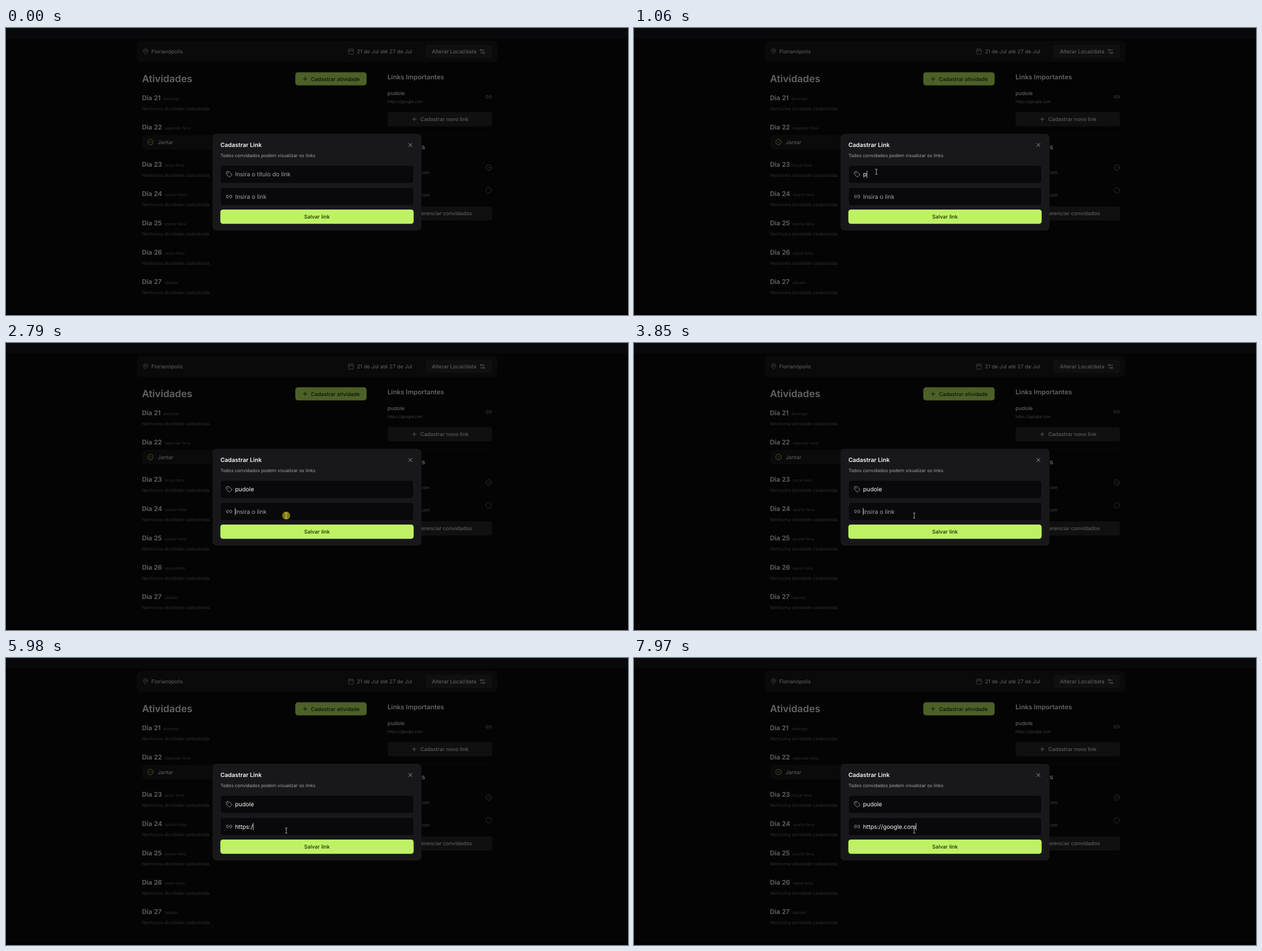
An HTML page that plays this animation: 1101x509 px, repeating every 8000 ms.

```html
<!DOCTYPE html>
<html lang="pt-BR">
<head>
<meta charset="utf-8">
<title>Cadastrar Link</title>
<style>
  html, body { margin: 0; width: 100%; height: 100%; overflow: hidden; background: #09090b; }
  svg { display: block; width: 1101px; height: 509px; }
  text { font-family: Inter, sans-serif; text-rendering: geometricPrecision; white-space: pre; }
  .icon { fill: none; stroke-width: 2; stroke-linecap: round; stroke-linejoin: round; }
</style>
</head>
<body>
<svg id="stage" viewBox="0 0 1905 880.7" preserveAspectRatio="none"></svg>
<script>
const stage = document.getElementById('stage');
const Z = { 50: '#fafafa', 100: '#f4f4f5', 200: '#e4e4e7', 400: '#a1a1aa', 500: '#71717a',
  800: '#27272a', 900: '#18181b', 950: '#09090b' };
const LIME = '#bef264', DARK_LIME = '#1a2e05';

const ICONS = {
  pin: '<path d="M20 10c0 6-8 12-8 12s-8-6-8-12a8 8 0 0 1 16 0Z"/><circle cx="12" cy="10" r="3"/>',
  calendar: '<path d="M8 2v4M16 2v4M3 10h18"/><rect x="3" y="4" width="18" height="18" rx="2"/>',
  settings: '<path d="M20 7h-9M14 17H5"/><circle cx="17" cy="17" r="3"/><circle cx="7" cy="7" r="3"/>',
  plus: '<path d="M5 12h14M12 5v14"/>',
  link: '<path d="M9 17H7A5 5 0 0 1 7 7h2M15 7h2a5 5 0 1 1 0 10h-2M8 12h8"/>',
  check: '<circle cx="12" cy="12" r="10"/><path d="m9 12 2 2 4-4"/>',
  dashed: '<circle cx="12" cy="12" r="10" stroke-dasharray="3.7 4.15"/>',
  close: '<path d="M18 6 6 18M6 6l12 12"/>',
  tag: '<path d="M12.6 2.6A2 2 0 0 0 11.2 2H4a2 2 0 0 0-2 2v7.2a2 2 0 0 0 .6 1.4l8.7 8.7a2.4 2.4 0 0 0 3.4 0l6.6-6.6a2.4 2.4 0 0 0 0-3.4z"/><circle cx="7.5" cy="7.5" r=".5"/>'
};

function add(tag, attrs, html = '', parent = stage) {
  const el = document.createElementNS('http://www.w3.org/2000/svg', tag);
  for (const k in attrs) el.setAttribute(k, attrs[k]);
  el.innerHTML = html;
  return parent.appendChild(el);
}
const box = (x, y, width, height, fill, rx = 0, stroke = 'none') =>
  add('rect', { x, y, width, height, fill, rx, stroke });
// Inset hairline used on raised surfaces
const panel = (x, y, w, h, rx) => {
  box(x, y, w, h, Z[900], rx);
  box(x + .5, y + .5, w - 1, h - 1, 'none', rx, 'rgba(255,255,255,.03)');
};
// y is the middle of the capitals
const label = (str, x, y, size, fill, weight = 400, anchor = 'start') =>
  add('text', { x, y: y + size * .364, 'font-size': size, fill, 'font-weight': weight, 'text-anchor': anchor }, str);
const icon = (name, x, cy, stroke) =>
  add('g', { class: 'icon', stroke, transform: `translate(${x} ${cy - 10}) scale(.8333)` }, ICONS[name]);

function drawHeader() {
  panel(400.5, 40, 1104, 64, 12);
  icon('pin', 417.5, 72, Z[400]);
  label('Florianópolis', 445, 72, 16, Z[100]);
  icon('calendar', 1046.5, 72, Z[400]);
  label('21 de Jul até 27 de Jul', 1243.5, 72, 16, Z[100], 400, 'end');
  box(1263, 60, 1, 24, Z[800]);
  box(1284, 52, 204.5, 40, Z[800], 8);
  label('Alterar Local/data', 1304, 72, 16, Z[200], 500);
  icon('settings', 1449, 72, Z[200]);
}

function drawActivities() {
  const x = 416.5;
  label('Atividades', x, 156, 30, Z[50], 600);
  box(886, 136, 218.5, 40, LIME, 8);
  icon('plus', 906, 156, DARK_LIME);
  label('Cadastrar atividade', 934, 156, 16, DARK_LIME, 500);

  const days = ['domingo', 'segunda-feira', 'terça-feira', 'quarta-feira', 'quinta-feira', 'sexta-feira', 'sábado'];
  let y = 200;
  days.forEach((day, i) => {
    label(`Dia ${21 + i}<tspan dx="8" font-size="12" font-weight="400" fill="${Z[500]}">${day}</tspan>`,
      x, y + 14, 20, Z[50], 600);
    if (i === 1) {
      panel(x, y + 38, 688, 44, 12);
      icon('check', x + 16, y + 60, LIME);
      label('Jantar', x + 48, y + 60, 16, Z[100]);
      y += 114;
    } else {
      label('Nenhuma atividade cadastrada.', x, y + 48, 14, Z[500]);
      y += 90;
    }
  });
}

function drawSidebar() {
  const x = 1168.5;
  label('Links Importantes', x, 150, 20, Z[50], 600);
  label('pudole', x, 200, 16, Z[100], 500);
  label('https://google.com', x, 226, 12, Z[400]);
  icon('link', 1468.5, 211, Z[400]);
  box(x, 258, 320, 44, Z[800], 8);
  icon('plus', 1240.5, 280, Z[200]);
  label('Cadastrar novo link', 1268.5, 280, 16, Z[200], 500);
  box(x, 326, 320, 1, Z[800]);

  label('Convidados', x, 365, 20, Z[50], 600);
  label('.com', 1298, 443, 14, Z[400], 400, 'end');
  icon('check', 1468.5, 428, '#6b95a0');
  label('.com', 1298, 513, 14, Z[400], 400, 'end');
  icon('dashed', 1468.5, 498, Z[400]);
  box(x, 547, 320, 44, Z[800], 8);
  label('Gerenciar convidados', 1427, 569, 16, Z[200], 500, 'end');
}

function makeField(y, iconName, hint, value, focus, blur, times) {
  const x = 701.5;
  box(657, y + .5, 591, 55, Z[950], 8, Z[800]);
  icon(iconName, 673.5, y + 28, Z[400]);
  return {
    x, value, focus, blur, times,
    hint: label(hint, x, y + 28, 18, Z[400]),
    text: label('', x, y + 28, 18, Z[50]),
    caret: box(x, y + 17, 1.3, 22, Z[50])
  };
}

drawHeader();
drawActivities();
drawSidebar();
box(0, 32, 1905, 849, 'rgba(0,0,0,.6)');
box(0, 874.5, 1905, 7, '#000');

panel(632.5, 325, 640, 296, 12);
label('Cadastrar Link', 656.5, 359, 18, Z[50], 600);
icon('close', 1228.5, 359, Z[400]);
label('Todos convidados podem visualizar os links', 656.5, 391, 14, Z[400]);
const fields = [
  makeField(421, 'tag', 'Insira o título do link', 'pudole', 530, 2790,
    [1060, 1130, 1460, 1660, 1730, 1850]),
  makeField(489, 'link', 'Insira o link', 'https://google.com', 2790, 8000,
    [4180, 4580, 4710, 4840, 4980, 5440, 5980, 6180, 6580, 6650, 6850, 7180, 7250, 7370, 7580, 7780, 7850, 7970])
];
box(656.5, 557, 592, 44, LIME, 8);
label('Salvar link', 952.5, 579, 16, DARK_LIME, 500, 'middle');

const pointer = add('g', {});
const halo = add('circle', { r: 12, fill: '#dcd200', opacity: .58 }, '', pointer);
const beam = add('path', { d: 'M-3.5-8h2.5l1 1 1-1h2.5M0-7V7M-3.5 8h2.5l1-1 1 1h2.5', fill: 'none',
  stroke: '#e0e0e0', 'stroke-width': 1.3 }, '', pointer);
const arrow = add('path', { d: 'M0 0v16l3.7-3.5 2.5 5.8 2.3-1-2.5-5.6h5.2z', fill: '#fff',
  stroke: '#000', 'stroke-width': 1 }, '', pointer);

const show = (el, on) => el.setAttribute('visibility', on ? 'visible' : 'hidden');
const easeOut = p => 1 - (1 - p) ** 2;
const easeBoth = p => p * p * (3 - 2 * p);
// The pointer advances in whole steps at 15 per second
const glide = (t, start, ease) =>
  ease(Math.min(Math.max(Math.floor((t - start + 2) / 66.7), 0), 6) / 6);

const SPOTS = [[1828, 862], [742.3, 441], [858.2, 529.5]];
function pointerAt(t) {
  const first = t < 2124;
  const [a, b] = first ? SPOTS : SPOTS.slice(1);
  const p = first ? glide(t, 70, easeOut) : glide(t, 2124, easeBoth);
  return a.map((v, i) => v + (b[i] - v) * p);
}

function drawField(f, t) {
  const count = f.times.filter(k => k <= t).length;
  const typed = f.value.slice(0, count);
  if (f.text.textContent !== typed) f.text.textContent = typed;
  show(f.hint, !count);
  const last = count ? f.times[count - 1] : f.focus;
  const focused = t >= f.focus && t < f.blur;
  show(f.caret, focused && (t - last) % 1060 < 530);
  f.caret.setAttribute('x', f.x + (count ? f.text.getComputedTextLength() : 0));
}

function render() {
  const t = performance.now() % 8000;
  fields.forEach(f => drawField(f, t));
  const [x, y] = pointerAt(t);
  const overField = x > 656 && x < 1248 && (y > 421 && y < 477 || y > 489 && y < 545);
  pointer.setAttribute('transform', `translate(${x} ${y})`);
  show(beam, t >= 70 && overField);
  show(arrow, t >= 70 && !overField);
  show(halo, t >= 530 && t < 600 || t >= 2790 && t < 2850);
  requestAnimationFrame(render);
}
render();
</script>
</body>
</html>
```
